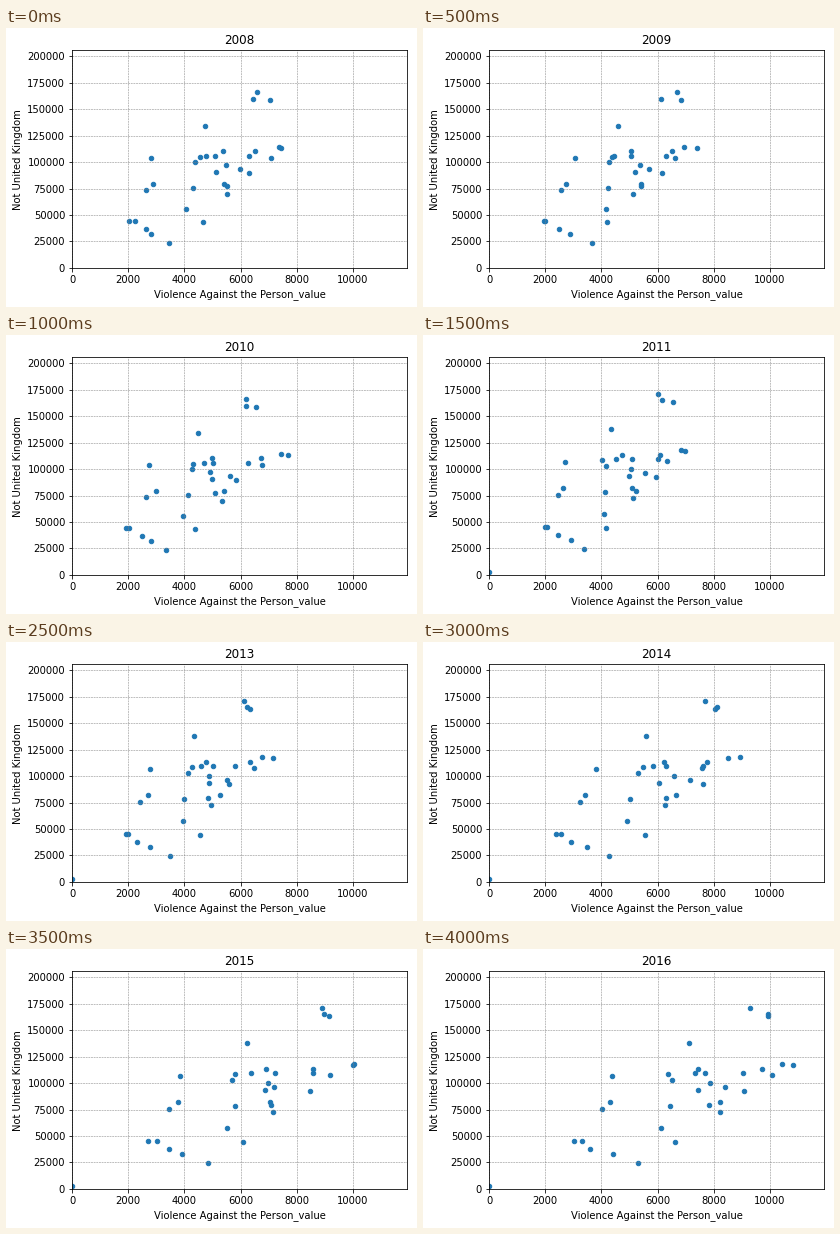
Animation, 411 px wide and 279 px high, one loop 4500 ms. Source, as a matplotlib script:

```python
import numpy as np
import matplotlib.pyplot as plt
from matplotlib.animation import FuncAnimation

W, H, DPI = 411, 279, 72
YEARS = range(2008, 2017)
CENSUS = 2011      # populations are updated in this year
UPTURN = 2013      # offences start to climb after this year

plt.rcParams.update({"font.family": "DejaVu Sans", "font.size": 10})

# One (residents in thousands, typical offences) pair per district;
# the last one is only counted from the census on
districts = np.array([
    (171, 6180), (165, 6160), (163.5, 6300), (138, 4440), (118, 6870), (117, 6960),
    (113.5, 4850), (113.5, 6145), (109.5, 4500), (109.5, 4900), (109.5, 5880),
    (108.5, 4120), (107.5, 6440), (107, 2810), (103, 4095), (100, 4915), (96, 5410),
    (93.5, 4855), (92.5, 5775), (82, 2770), (82, 5160), (79.5, 5060), (78, 3980),
    (75.5, 2480), (72.5, 4990), (57.5, 3900), (45.5, 1920), (45.5, 2045),
    (44.5, 4320), (38, 2375), (33, 2750), (24.5, 3330), (2.5, 0)])


def trend(year):
    """Level of offences: a slow fall, a flat stretch, then a steep rise."""
    fall = 0.025 * max(0, CENSUS - year)
    rise = 0.58 * (max(0, year - UPTURN) / 3) ** 0.7
    return 1 + fall + rise


def positions(year):
    early = year < CENSUS
    people, offences = districts[:-1 if early else None].T
    rng = np.random.default_rng(year)
    wobble = 1 + rng.normal(0, 0.03, len(people))
    growth = 0.97 if early else 1
    return np.column_stack([offences * trend(year) * wobble, people * 1000 * growth])


fig = plt.figure(figsize=(W / DPI, H / DPI), dpi=DPI, facecolor="white")
ax = fig.add_axes([66.1 / W, 39.12 / H, 334.8 / W, 217.44 / H])
ax.set_xlim(0, 11922)
ax.set_ylim(0, 205600)
ax.set_xticks(range(0, 10001, 2000))
ax.set_yticks(range(0, 200001, 25000))
ax.set_xlabel("Violence Against the Person_value")
ax.set_ylabel("Not United Kingdom")
ax.grid(color="gray", linestyle="--", linewidth=0.5)
title = ax.set_title("")
dots = ax.scatter([], [], s=20, color="#1f77b4")


def draw(i):
    year = YEARS[i]
    dots.set_offsets(positions(year))
    title.set_text(str(year))
    return dots, title


anim = FuncAnimation(fig, draw, frames=len(YEARS), init_func=lambda: draw(0),
                     interval=500, repeat=True, repeat_delay=0, blit=False)
plt.show()
```
